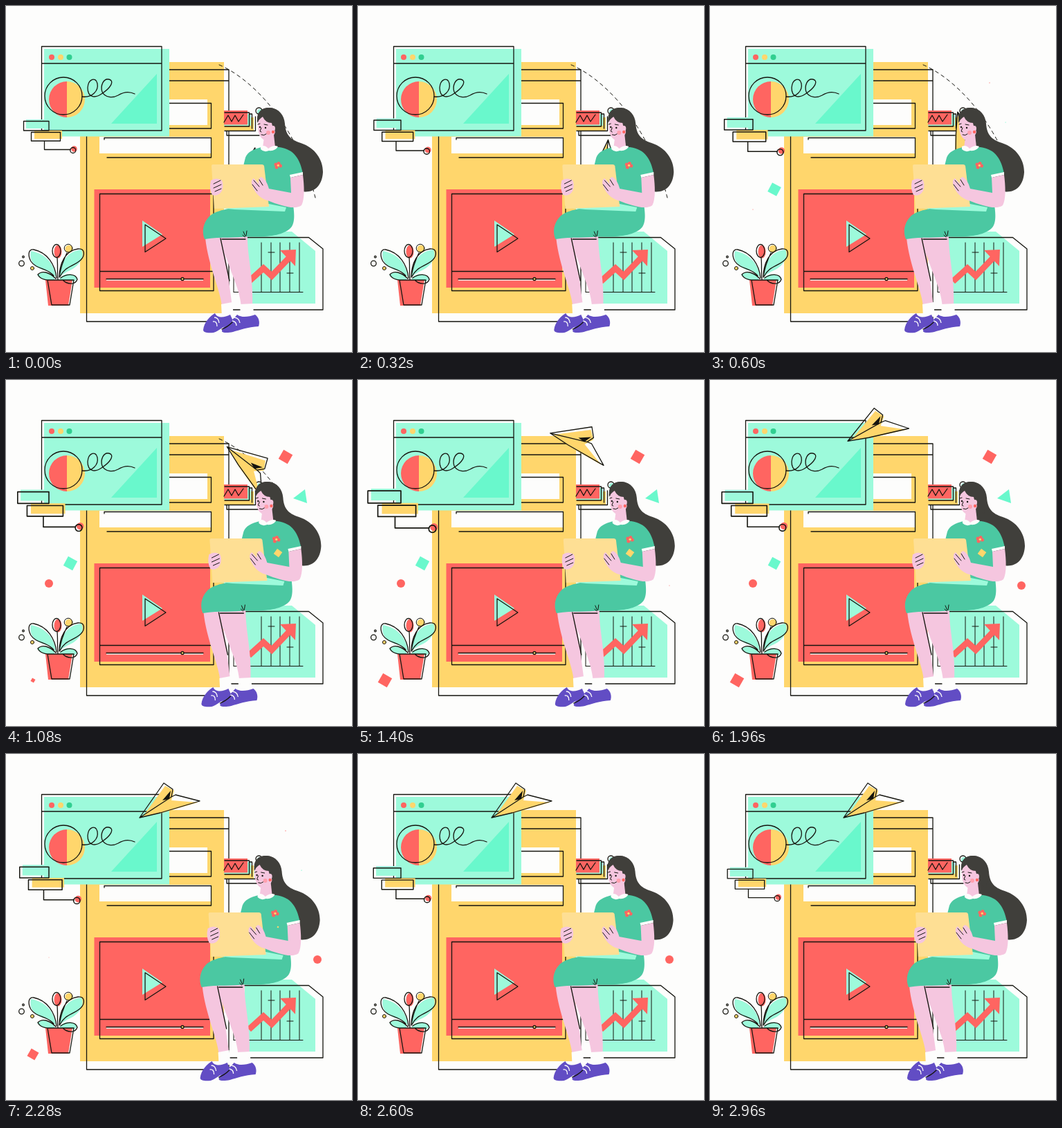
Animation, 500 px wide and 500 px high, one loop 3 s. Source, as an HTML page:

```html
<!DOCTYPE html>
<html lang="en">
<head>
<meta charset="utf-8">
<title>Working with content</title>
<style>
html, body { margin: 0; width: 100%; height: 100%; overflow: hidden; background: #fdfdfc; }
svg { display: block; width: 100vw; height: 100vh; }
.o { fill: none; stroke: #15150f; stroke-width: 1.3; stroke-linejoin: round; stroke-linecap: round; }
.thin { stroke-width: 1; }
.red { fill: #ff6561; } .yel { fill: #ffd66c; } .grn { fill: #9dfadb; } .mint { fill: #69f8cc; }
.white { fill: #fdfdfc; } .skin { fill: #f5c6df; } .dress { fill: #4bc8a2; } .hair { fill: #403f3b; }
.ink { fill: #15150f; } .shoe { fill: #624dc4; } .paper { fill: #fedf94; }
</style>
</head>
<body>
<svg viewBox="0 0 500 500">
  <!-- phone -->
  <g>
    <path class="yel" d="M107 81H315V444H107Z"/>
    <path class="white" d="M220 135H291V172H220Z M135 189H296V213H135Z"/>
    <path class="o" d="M116.500 92H322V456H116.500Z M220 108H322 M220 140.500H296.500V177H220 M142 193V190.500H296.500V219H146"/>
    <path class="red" d="M127.500 265H295V407H127.500Z"/>
    <path d="M145 395.500H285" stroke="#f4d9d4" stroke-width="3"/>
    <path class="o" d="M135.500 271.500H300V411.500H135.500Z M135.500 383.500H300 M145 394.500H285"/>
    <circle class="o" cx="255" cy="394.500" r="2" style="fill:#ffd66c"/>
    <path class="grn" d="M197 310L226 330L197 348Z"/>
    <path class="o" d="M201 316L231 336L201 355.500Z"/>
  </g>

  <!-- stacked cards -->
  <g>
    <path class="yel" d="M315 161H358V180H315Z"/>
    <path class="grn" d="M315 156H354V173H315Z"/>
    <path class="red" d="M315 151H349V171.500H315Z"/>
    <path class="o" d="M316 154H351.500V174H316 M351.500 156H355.500V177M316 180.500H360.500V160 M319 180.500V187H366 M315 168L321 158L326 167L331 158L336 167L343 157"/>
    <circle class="grn" cx="367" cy="153" r="4"/>
    <circle class="o" cx="365.500" cy="151.500" r="4.500"/>
  </g>

  <!-- browser window -->
  <g>
    <path class="grn" d="M55 62H236V188.500H55Z"/>
    <path class="mint" d="M218 98V170H152Z"/>
    <path class="red" d="M88 109A26 26 0 0 0 88 161Z"/>
    <path class="yel" d="M88 109A26 26 0 0 1 88 161Z"/>
    <path class="o" d="M51.500 58.500H225V180H51.500Z M51.500 83H225"/>
    <circle class="red" cx="66" cy="74" r="4"/>
    <circle class="yel" cx="79" cy="74" r="4"/>
    <circle cx="91.500" cy="74" r="4" fill="#31cf90"/>
    <circle class="o" cx="83" cy="130" r="27"/>
    <path class="o" d="M110 131C125 133 134 122 132 112C130 102 119 105 118 118C118 132 128 134 138 127C152 118 157 108 149 106C141 104 136 115 139 124C143 133 155 133 162 129C170 124 178 123 186 127"/>
  </g>

  <g id="tags">
    <path class="grn" d="M29 164H64V177H29Z"/>
    <path class="yel" d="M41 180H81V192H41Z"/>
    <circle class="red" cx="98.500" cy="206.500" r="4.200"/>
    <path class="o" d="M25.500 166.500H62V180H25.500Z M36.500 182.500H78.500V195H36.500Z M55.500 195V207.500H93"/>
    <circle class="o" cx="96.800" cy="208.500" r="4"/>
  </g>

  <!-- chart -->
  <g>
    <path class="grn" d="M345 326H413L447 354V430H345Z"/>
    <path class="o" d="M328 334.500H437.500L458 351V439H322"/>
    <path class="o thin" d="M369 342V413 M383 342V413 M396 342V413 M410 342V413 M424 342V413 M329 413.500H429 M329 375V413 M379 356H388 M406 386H415"/>
    <path d="M351 398L372 379L384 390L410 363" fill="none" stroke="#ff6561" stroke-width="9"/>
    <path class="red" d="M396 353L419 352L418 376Z"/>
  </g>

  <!-- plant -->
  <g>
    <path class="grn" d="M72 392C70 372 57 358 36 354C32 370 45 381 62 383Z M77 391C78 370 89 354 109 352C115 362 105 378 88 384Z M70 393C60 383 50 384 45 389C53 397 62 396 70 396Z M78 393C86 385 99 386 103 394C96 402 86 399 78 396Z"/>
    <path class="red" d="M57 396H96L90 433H61Z"/>
    <ellipse class="red" cx="75" cy="355" rx="5.500" ry="9.500"/>
    <circle class="yel" cx="91" cy="351" r="5.500"/>
    <circle class="yel" cx="38" cy="379" r="2.500"/>
    <path class="o" d="M73 393C71 374 60 356 40 352C31 351 32 362 36 369C44 381 60 378 69 390 M77 392C77 372 86 353 104 351C115 350 114 361 108 367C97 377 85 376 78 391 M72 394C62 384 52 382 46 388C50 397 62 396 70 396 M79 393C88 386 101 387 103 395C100 404 88 402 82 396 M74 364C75 375 74 386 75 395 M88 357C83 367 79 379 77 391 M60 396H98L92 432H66Z"/>
    <ellipse class="o" cx="73" cy="354" rx="6" ry="9.500"/>
    <circle class="o thin" cx="90" cy="350" r="5.800"/>
    <circle class="o" cx="22.500" cy="372" r="3.800"/>
    <circle class="o thin" cx="38" cy="379" r="2.500"/>
    <circle class="o" cx="25" cy="362.500" r="1.300"/>
  </g>

  <clipPath id="trailClip"><rect id="trailRect" x="300" y="75" width="160" height="210"/></clipPath>
  <path class="o thin" clip-path="url(#trailClip)" d="M308 85C355 105 420 170 447 277" style="stroke-dasharray:5 5"/>

  <g id="plane">
    <path class="yel" d="M5 -2L37 -46L50 -39L46 -25L84 -22L33 -7Z"/>
    <path class="ink" d="M33 -25L45 -39L43 -27Z"/>
    <path class="o" d="M0 0L35 -50L48 -41L46 -30L52 -33L87 -24L30 -7Z M0 0L46 -30"/>
  </g>

  <g id="woman">
    <path class="hair" d="M363 163C363 151 372 146 381 147C395 148 402 158 403 170C404 185 410 193 426 198C447 205 458 222 458 240C457 260 445 271 427 268L392 225L376 200Z"/>
    <!-- legs -->
    <path class="skin" d="M287 329H313L327 435H312C311 413 292 375 288 335Z"/>
    <path class="skin" d="M309 329H349C348 361 358 390 356 435H340C337 401 321 384 309 329Z"/>
    <path class="o" d="M310 336L323 397 M312 337H346"/>
    <path class="white" d="M311 431L327 428L329 449L312 450Z M338 431L357 430L358 447L339 449Z"/>
    <path class="shoe" d="M285 468C286 457 296 447 302 444C305 451 315 451 324 446L329 457C316 461 307 470 300 472C292 473 285 472 285 468Z"/>
    <path class="shoe" d="M312 470C312 463 325 457 334 446C341 451 351 449 360 446C366 450 367 458 365 463C349 464 338 468 328 471C319 473 312 472 312 470Z"/>
    <path d="M301 450Q307 450 308 458 M299 456Q305 455 305 463 M330 450Q337 451 338 458 M327 455Q333 456 333 462" fill="none" stroke="#fdfdfc" stroke-width="1.300"/>
    <path class="o" d="M312 467Q320 464 327 457"/>
    <!-- dress -->
    <path class="dress" d="M369 204C357 207 349 211 346 219L341 239L359 246L358 291C328 290 302 295 293 305C284 315 283 327 287 337C312 333 330 336 350 333C374 334 400 333 412 320C419 312 416 294 414 281L413 246L429 242C425 222 417 207 395 204Z"/>
    <path class="skin" d="M373 189L387 186L389 204Q381 213 371 205Z"/>
    <path class="white" d="M368 203Q374 200 379 206Q387 200 393 203Q389 210 380 209Q373 212 368 207Z M410 244L429 240L429 244L411 248Z"/>
    <!-- head -->
    <path class="skin" d="M365 164C363 176 364 188 372 193C381 194 389 189 390 177L388 161C379 154 370 157 365 164Z"/>
    <path class="hair" d="M363 169C362 154 371 147 381 147C395 148 402 160 402 174L399 193L389 188C391 180 385 177 384 169Q375 169 371 160Q366 163 363 169Z"/>
    <ellipse class="skin" cx="386" cy="177" rx="3" ry="4"/>
    <circle class="red" cx="386" cy="182" r="2.200"/>
    <circle cx="379" cy="183" r="3" fill="#ff9fae"/>
    <circle class="ink" cx="367" cy="175" r="1.200"/>
    <circle class="ink" cx="375" cy="176" r="1.200"/>
    <path class="o thin" d="M364 171L367 170 M373 171L378 172 M369 176L367 181L369 182 M369 186Q373 188 376 185"/>
    <!-- flower -->
    <g class="red"><circle cx="390" cy="229" r="2.500"/><circle cx="394" cy="227.500" r="2.500"/><circle cx="396.500" cy="231" r="2.500"/><circle cx="391" cy="233" r="2.500"/></g>
    <circle class="yel" cx="393.300" cy="230.300" r="1.600"/>
    <!-- laptop and arms -->
    <path class="grn" d="M300 291L380 286L405 291L403 297L330 294Z"/>
    <path class="paper" d="M297 231Q297 229 299 229L370 229Q372 229 373 231L380 290L301 293Z"/>
    <path class="skin" d="M411 248L429 244C431 260 432 279 427 288C418 295 398 289 378 281C367 278 359 270 355 257Q354 251 358 249L365 257Q364 248 369 247Q376 250 380 264L412 270Z"/>
    <path class="skin" d="M296 252Q304 247 312 252Q315 259 312 267Q307 276 298 273Q293 264 296 252Z"/>
    <path class="o thin" d="M300 257L310 252 M300 263L311 258 M302 268L311 264 M358 252L366 261 M356 258L363 267 M366 251L371 259 M343 326L346 333 M348 325L347 332 M342 331L345 334"/>
  </g>

  <g id="confetti"></g>
</svg>
<script>
const LOOP = 3000;
const $ = id => document.getElementById(id);
const clamp = v => Math.max(0, Math.min(1, v));
const easeOut = v => 1 - (1 - clamp(v)) ** 2;

const square = "M-7.500 -7.500H7.500V7.500H-7.500Z";
const disc = "M-6 0A6 6 0 1 1 6 0A6 6 0 1 1 -6 0Z";
const pieces = [
  { x: 93, y: 265, angle: 28, tint: "mint", shape: square, from: 340, to: 1940 },
  { x: 62, y: 294, angle: 0, tint: "red", shape: disc, from: 585, to: 2060 },
  { x: 404, y: 111, angle: 30, tint: "red", shape: square, from: 590, to: 2060 },
  { x: 427, y: 168, angle: 0, tint: "mint", shape: "M-12 3L5 -10L8 10Z", from: 590, to: 2060 },
  { x: 393, y: 250, angle: 36, tint: "yel", shape: "M-4.500 -4.500H4.500V4.500H-4.500Z", from: 640, to: 2100 },
  { x: 39, y: 434, angle: 30, tint: "red", shape: square, from: 1020, to: 2240 },
  { x: 450, y: 297, angle: 0, tint: "red", shape: disc, from: 1385, to: 2680 }
];
for (const p of pieces) {
  p.node = document.createElementNS("http://www.w3.org/2000/svg", "path");
  p.node.setAttribute("class", p.tint);
  p.node.setAttribute("d", p.shape);
  $("confetti").append(p.node);
}

function draw(t) {
  const sway = -2.200 * (1 - Math.cos(t / 1500 * 2 * Math.PI));
  $("woman").setAttribute("transform", `translate(${sway} 0)`);

  const grow = 1 + 0.330 * (1 - Math.abs(t / 1500 - 1));
  $("tags").setAttribute("transform", `translate(62 187) scale(${grow}) translate(-62 -187)`);

  // The plane swings at constant speed around a pivot, out from behind the woman.
  const swing = Math.min(135, Math.max(0, (2010 - t) * 0.0763));
  $("plane").setAttribute("transform", `rotate(${swing} 253 183) translate(193 92)`);

  const left = 1 - clamp(t / 1320) ** 2.500;
  $("trailRect").setAttribute("height", 210 * left);

  for (const p of pieces) {
    const size = easeOut((t - p.from) / 320) * (1 - clamp((t - p.to) / 240));
    p.node.setAttribute("transform", `translate(${p.x} ${p.y}) rotate(${p.angle}) scale(${size})`);
  }
}

const start = performance.now();
function tick() {
  draw((performance.now() - start) % LOOP);
  requestAnimationFrame(tick);
}
tick();
</script>
</body>
</html>
```
